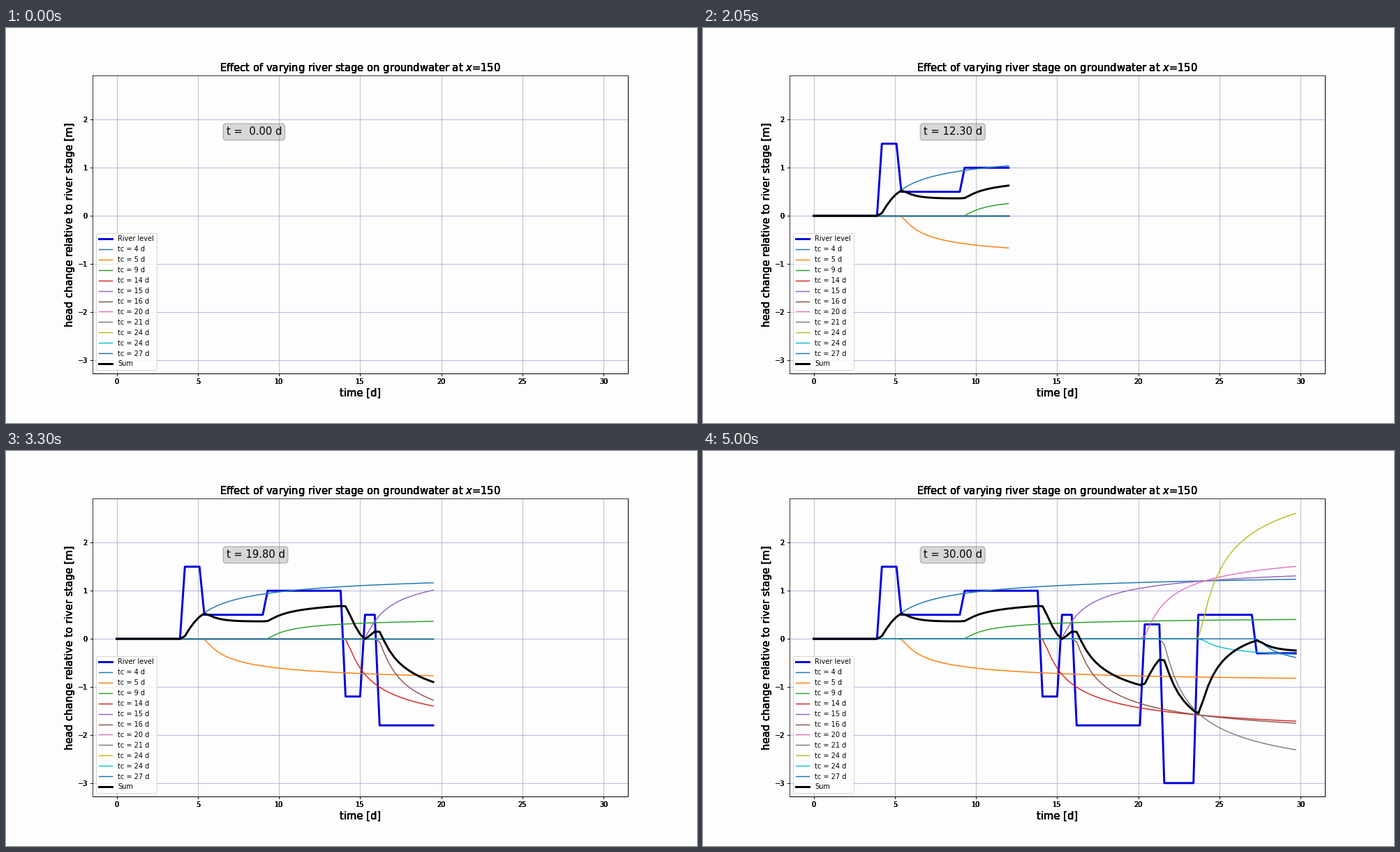
A matplotlib script for the animation above (5050 ms loop, 990 by 566 pixels).

```python
import math

import numpy as np
import matplotlib.pyplot as plt
from matplotlib.animation import FuncAnimation

DPI = 990 / 14   # a sheet 14 inches wide
PAPER = "#fdfdfd"
BOX = [0.125, 0.125, 0.775, 0.755]
STEP = 0.3       # days per frame
FRAMES = 101

plt.rcParams.update({"font.family": "DejaVu Sans", "font.size": 10})

# (time of change in days, new river level in m)
changes = [(3.91, 1.5), (5.2, 0.5), (9.1, 1.0), (13.94, -1.2), (15.09, 0.5),
           (15.94, -1.8), (20.15, 0.3), (21.32, -3.0), (23.55, 1.0),
           (23.65, 0.5), (27.15, -0.3)]
tc = np.array([c[0] for c in changes])
jumps = np.diff([0.0] + [c[1] for c in changes])

distance, diffusivity = 150.0, 9000.0
t = np.arange(FRAMES) * STEP


def response(jump, start):
    """Head at the observation point after a sudden change of river level."""
    head = np.zeros_like(t)
    for k, tau in enumerate(t - start):
        if tau > 0:
            head[k] = jump * math.erfc(distance / math.sqrt(4 * diffusivity * tau))
    return head


river = sum(j * (t >= s) for j, s in zip(jumps, tc))
heads = [response(j, s) for j, s in zip(jumps, tc)]
total = sum(heads)

lo = min(river.min(), min(h.min() for h in heads))
hi = max(river.max(), max(h.max() for h in heads))
margin = 0.05 * (hi - lo)

fig = plt.figure(figsize=(990.01 / DPI, 566.01 / DPI), dpi=DPI, facecolor=PAPER)


def make_axes(zorder):
    ax = fig.add_axes(BOX, facecolor=PAPER, zorder=zorder, label=f"layer {zorder}")
    ax.set_xlim(-0.05 * t[-1], 1.05 * t[-1])
    ax.set_ylim(lo - margin, hi + margin)
    ax.set_xticks(range(0, 31, 5))
    ax.set_yticks(range(-3, 3))
    ax.set_title("Effect of varying river stage on groundwater at $x$=150", fontsize=15)
    ax.set_xlabel("time [d]", fontsize=15)
    ax.set_ylabel("head change relative to river stage [m]", fontsize=15)
    return ax


# Stacked layers harden the edges of the lettering around the plot.
for z in range(4):
    make_axes(z)
ax = make_axes(4)
ax.grid(axis="x", color="#bcbcc6", linewidth=1)
ax.grid(axis="y", color="#b6b6da", linewidth=1)

curves = []


def add_curve(values, label, **style):
    line, = ax.plot([], [], label=label, **style)
    curves.append((line, values))


add_curve(river, "River level", color="#0000dc", linewidth=3)
for k, (start, head) in enumerate(zip(tc, heads)):
    add_curve(head, f"tc = {start:.0f} d", color=f"C{k % 10}", linewidth=1.5)
add_curve(total, "Sum", color="black", linewidth=3)

ax.legend(loc="lower left", fontsize=10)
clock = ax.text(0.25, 0.8, "", transform=ax.transAxes, fontsize=15,
                bbox=dict(boxstyle="round", facecolor="gray", alpha=0.3))


def draw(i):
    for line, values in curves:
        line.set_data(t[:i], values[:i])
    clock.set_text(f"t = {t[i]:5.2f} d")
    return [line for line, _ in curves] + [clock]


anim = FuncAnimation(fig, draw, frames=FRAMES, init_func=lambda: draw(0),
                     interval=50, repeat=True, repeat_delay=0, blit=False)
plt.show()
```
